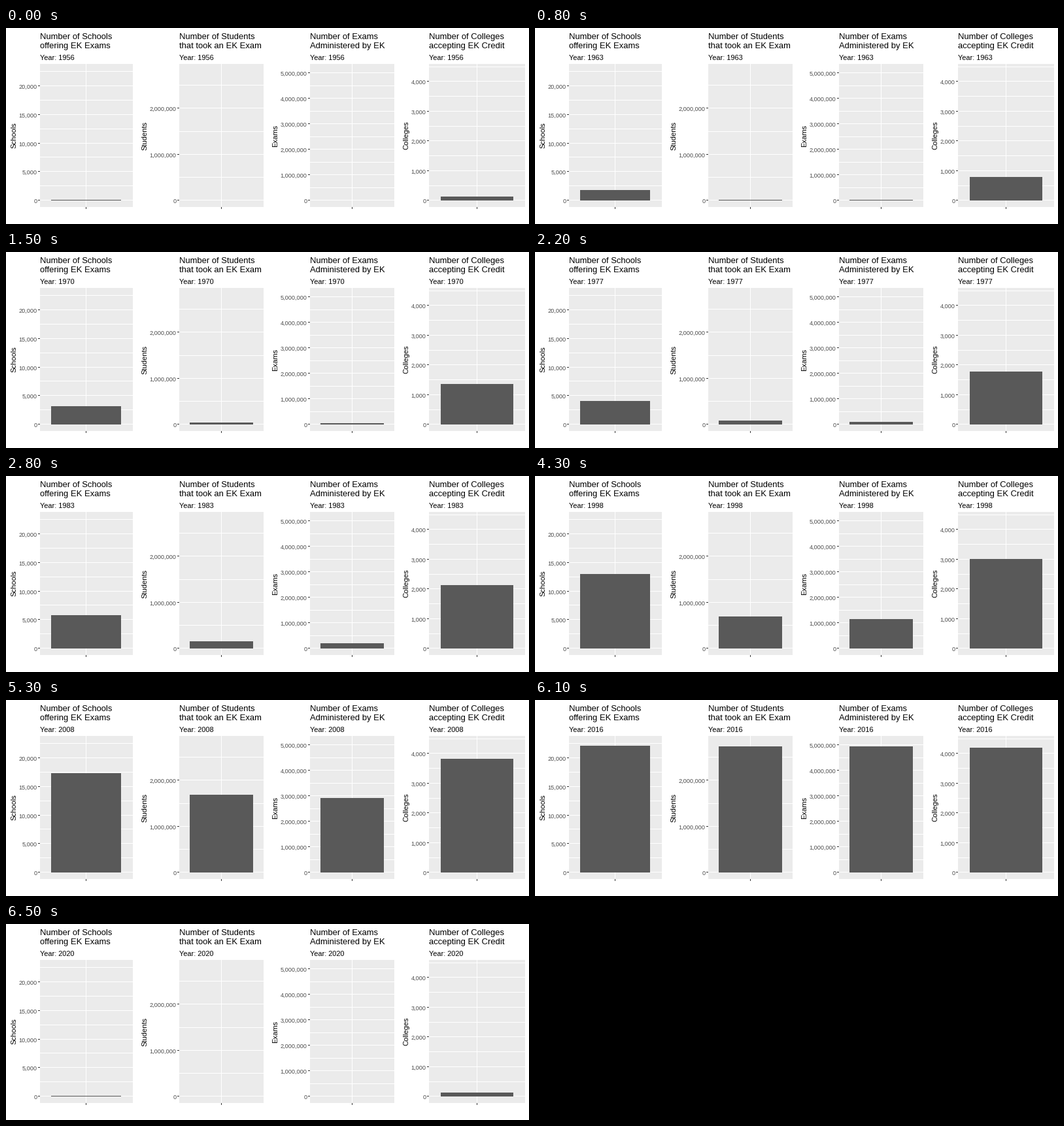
Write a matplotlib script that moves like this. It is 800x300 px and loops after 6600 ms.

```python
import matplotlib.pyplot as plt
import numpy as np
from matplotlib.animation import FuncAnimation
from matplotlib.patches import Rectangle

FRAMES, INTERVAL = 66, 100
W, H, DPI = 800, 300, 100
FIRST, YEARS = 1956, 65
TOP, BOTTOM, ZERO = 55, 274, 264.28
PEAK = 199.1  # height of the tallest bar
BAR, PANEL, TICK, LABEL = "#595959", "#EBEBEB", "#333333", "#4D4D4D"

plt.rcParams["font.family"] = "Liberation Sans"

# Key years; the rest is interpolated
SCHOOLS = {1956: 104, 1964: 2086, 1970: 3186, 1974: 3357, 1983: 5827,
           1999: 13007, 2009: 17374, 2017: 22169, 2019: 22678}
STUDENTS = {1956: 1230, 1960: 10500, 1966: 38200, 1974: 60900, 1983: 158000,
            1990: 330000, 1999: 704000, 2009: 1692000, 2017: 2741000,
            2019: 2826000}
EXAMS = {1956: 2200, 1960: 14200, 1966: 50100, 1974: 79000, 1983: 211000,
         1990: 490000, 1999: 1150000, 2009: 2930000, 2017: 4958000,
         2019: 5099000}
COLLEGES = {1956: 130, 1966: 1076, 1970: 1368, 1983: 2130, 1988: 2256,
            1992: 2722, 1999: 3007, 2002: 3388, 2009: 3825, 2017: 4215,
            2020: 4376}

fig = plt.figure(figsize=(W / DPI, H / DPI), dpi=DPI, facecolor="white")
ax = fig.add_axes([0, 0, 1, 1])
ax.set_xlim(0, W)
ax.set_ylim(H, 0)
ax.axis("off")


def text(x, y, s, px, color="black", **kw):
    kw.setdefault("va", "baseline")
    return ax.text(x, y, s, fontsize=px * 72 / DPI, color=color, **kw)


def box(x0, y0, x1, y1, color, z):
    patch = Rectangle((x0, y0), x1 - x0, y1 - y0, fc=color, lw=0,
                      zorder=z, antialiased=False)
    return ax.add_patch(patch)


def pixel(v):
    """Row or column of a one-pixel line."""
    return int(v - 0.48)


class Chart:
    def __init__(self, left, right, title, name, keys, step, growth=False):
        years, values = list(keys), np.array(list(keys.values()))
        curve = np.arange(FIRST, FIRST + YEARS)
        if growth:
            curve = np.exp(np.interp(curve, years, np.log(values)))
        else:
            curve = np.interp(curve, years, values)
        scale = PEAK / curve.max()
        self.tops = ZERO - curve * scale

        box(left, TOP, right, BOTTOM, PANEL, 1)
        half = 0
        while (y := ZERO - half * step / 2 * scale) > TOP:
            row = pixel(y)
            box(left, row, right, row + 1, "white", 2)
            if half % 2 == 0:
                box(left - 3, row, left, row + 1, TICK, 2)
                text(left - 4.6, row + 4.6, f"{half // 2 * step:,}", 9.2,
                     LABEL, ha="right")
            half += 1
        col = pixel((left + right) / 2)
        box(col, TOP, col + 1, BOTTOM, "white", 2)
        box(col, BOTTOM, col + 1, BOTTOM + 3, TICK, 2)

        for i, row in enumerate(title):
            text(left, 17 + 14 * i, row, 13)
        self.year = text(left, 49, "", 11)
        text(right // 200 * 200 + 17, (TOP + BOTTOM) / 2, name, 11.1,
             rotation=90, ha="right", va="center")

        pad = (right - left) / 8
        self.bar = box(round(left + pad - 0.6), 264, round(right - pad), 264,
                       BAR, 3)

    def show(self, year, index):
        top = round(self.tops[index])
        self.bar.set_y(top)
        self.bar.set_height(264 - top)
        self.year.set_text(f"Year: {year}")


charts = [
    Chart(52, 194, ("Number of Schools", "offering EK Exams"),
          "Schools", SCHOOLS, 5000),
    Chart(265, 394, ("Number of Students", "that took an EK Exam"),
          "Students", STUDENTS, 1000000, growth=True),
    Chart(465, 594, ("Number of Exams", "Administered by EK"),
          "Exams", EXAMS, 1000000, growth=True),
    Chart(647, 794, ("Number of Colleges", "accepting EK Credit"),
          "Colleges", COLLEGES, 1000),
]


def update(i):
    elapsed = max(i - 1, 0)
    # The bars run a year ahead of the caption in the second half, then wrap
    index = elapsed if i < FRAMES // 2 else i % YEARS
    for chart in charts:
        chart.show(FIRST + elapsed, index)
    return []


anim = FuncAnimation(fig, update, frames=FRAMES, interval=INTERVAL,
                     repeat=True, repeat_delay=0)
plt.show()
```
